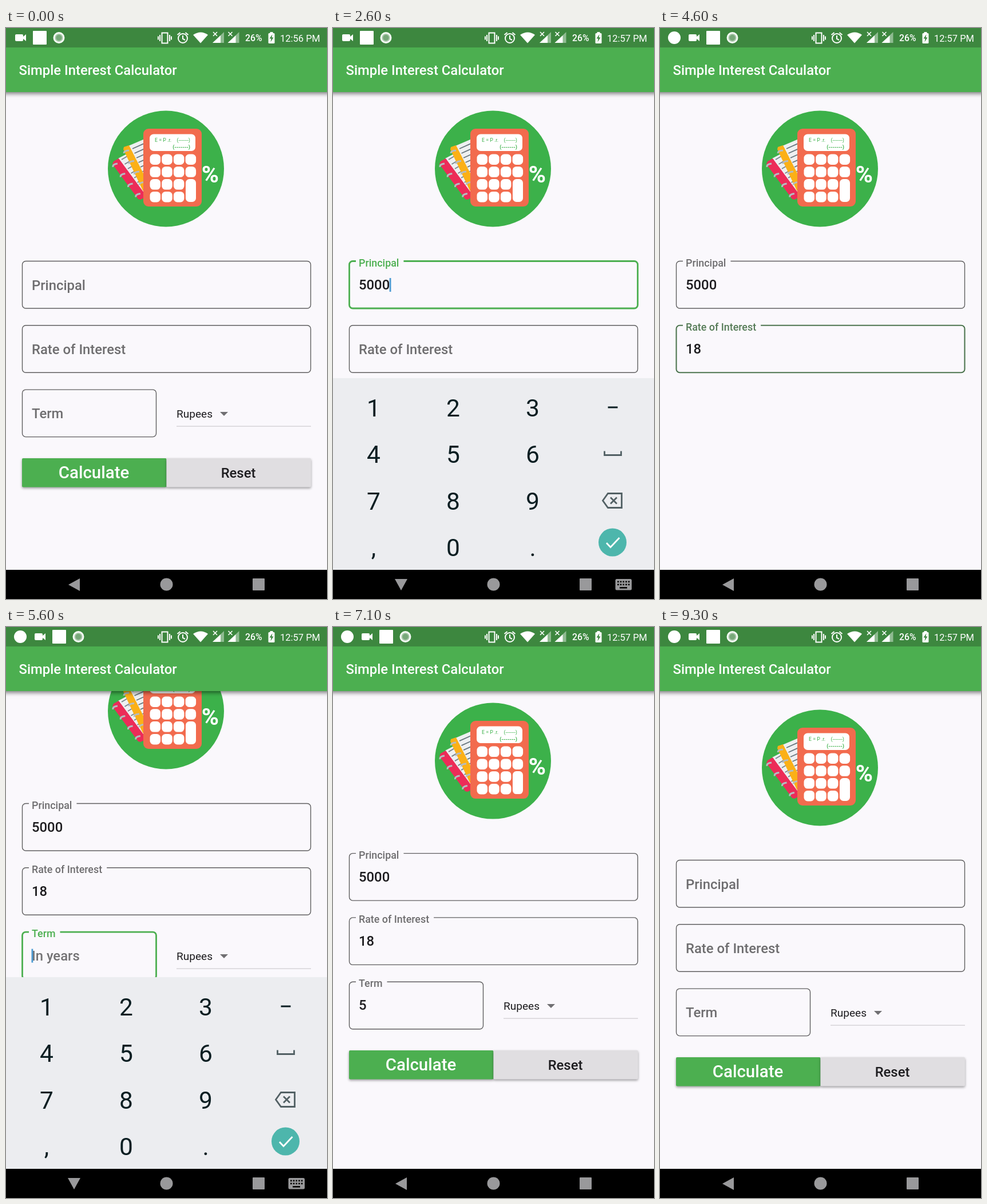
An HTML page with a canvas for the animation above (9700 ms loop, 561 by 998 pixels).

```html
<!DOCTYPE html>
<html lang="en">
<head>
<meta charset="utf-8">
<title>Simple Interest Calculator</title>
<style>
html, body { margin: 0; width: 100%; height: 100%; overflow: hidden; background: #faf8fc; }
canvas { display: block; width: 561px; height: 998px; }
</style>
</head>
<body>
<canvas id="stage" width="561" height="998"></canvas>
<script>
const c = document.getElementById('stage').getContext('2d');
const LOOP = 9700, GREEN = '#4caf50', PAPER = '#faf8fc', INK = '#1d1c1f', ICON = '#99999b';
const TITLE = 23.84, BODY = 19.07;

const ramp = (t, start, length) => Math.min(1, Math.max(0, (t - start) / length));
const ease = p => p * p * (3 - 2 * p);
const mix = (a, b, p) => a + (b - a) * p;
const between = (t, a, b) => t >= a && t < b;
const pulse = (t, on, off, length) => ease(ramp(t, on, length)) * (1 - ease(ramp(t, off, length)));
// Colour between translucent black and the theme green.
const tint = (p, alpha) => `rgba(${76 * p},${175 * p},${80 * p},${mix(alpha, 1, p)})`;

function text(str, x, y, size, color = INK, weight = 400, align = 'left') {
  c.font = `${weight} ${size}px Roboto, sans-serif`;
  c.textAlign = align;
  c.fillStyle = color;
  c.fillText(str, x, y);
}
function box(x, y, w, h, color, r = 0) {
  c.beginPath();
  c.roundRect(x, y, w, h, r);
  c.fillStyle = color;
  c.fill();
}
function disc(x, y, r, color) {
  c.beginPath();
  c.arc(x, y, r, 0, 7);
  c.fillStyle = color;
  c.fill();
}
function poly(color, ...xy) {
  c.beginPath();
  for (let i = 0; i < xy.length; i += 2) c.lineTo(xy[i], xy[i + 1]);
  c.closePath();
  c.fillStyle = color;
  c.fill();
}
function stroke(d, color, width = 2) {
  c.strokeStyle = color;
  c.lineWidth = width;
  c.stroke(new Path2D(d));
}
function shadowed(blur, dy, alpha, draw) {
  c.save();
  c.shadowColor = `rgba(0,0,0,${alpha})`;
  c.shadowBlur = blur;
  c.shadowOffsetY = dy;
  draw();
  c.restore();
}
function clipped(x, y, w, h, draw) {
  c.save();
  c.beginPath();
  c.rect(x, y, w, h);
  c.clip();
  draw();
  c.restore();
}

function statusBar(t) {
  box(0, 0, 561, 34, '#3d873f');
  const late = t >= 3400, dx = late ? 34 : 0;
  if (late) disc(25, 17, 11, '#fff');
  box(16 + dx, 11, 14, 12, '#fff', 2);
  poly('#fff', 29 + dx, 16, 35 + dx, 11, 35 + dx, 23, 29 + dx, 18);
  box(47 + dx, 5, 24, 24, '#fff', 1);
  disc(92.5 + dx, 17, 10, '#f4faf4');
  disc(92.5 + dx, 17, 7, '#a9c6aa');
  disc(92.5 + dx, 17, 5, '#77a879');

  stroke('M272.5 8.5h10v18h-10zM269 12v11M286 12v11M266 14.5v6M289 14.5v6', '#fff');
  stroke('M301 18a8 8 0 1 0 16 0a8 8 0 1 0-16 0M309 13v6l4 2M299.500 12l5-4M318.500 12l-5-4', '#fff');
  c.fillStyle = '#fff';
  c.fill(new Path2D('M327 12Q340.500 3 353 12L340 26.500Z'));
  for (const x of [361, 387.5]) {
    poly('#8fbb91', x, 26, x + 20, 7, x + 20, 26);
    poly('#fff', x, 26, x + 14, 13, x + 14, 26);
    stroke(`M${x + 1} 7l7 7M${x + 8} 7l-7 7`, '#fff', 1.6);
  }
  text('26%', 418, 23, 15.8, '#fff', 500);
  box(458.5, 9, 11, 18, '#fff', 1.5);
  box(461.5, 7, 5, 3, '#fff');
  poly('#3d873f', 465.5, 11, 460.5, 18.5, 463.5, 18.5, 462.5, 24.5, 467.5, 16.5, 464.5, 16.5);
  text(t < 1000 ? '12:56 PM' : '12:57 PM', 549, 23.5, 16.5, '#fff', 400, 'right');
}

function appBar() {
  shadowed(7, 3, .5, () => box(-10, 34, 581, 78, GREEN));
  text('Simple Interest Calculator', 22.5, 81.5, TITLE, '#fff', 500);
}

function notebooks() {
  poly('#eef0f1', 196, 228, 234, 208, 250, 300, 240, 294);
  for (let i = 0; i < 6; i++) {
    const x = 202 + i * 5.5, y = 230 + i * 8;
    stroke(`M${x} ${y}l22-13`, '#77848b', 1.8);
  }
  c.lineJoin = 'round';
  poly('#ec2c58', 186, 238, 188, 233, 197, 228, 242, 289, 241, 297, 235, 300, 231, 299);
  poly('#eef0f1', 214, 206, 242, 194, 242, 270);
  for (let i = 0; i < 6; i++) {
    const x = 221 + i * 3.5, y = 211 + i * 8;
    stroke(`M${x} ${y}L243 ${y - (243 - x) * .45}`, '#66757c', 1.8);
  }
  poly('#fbb017', 205, 212, 206, 208, 215, 205, 243, 260, 243, 286, 239, 284);
  for (let i = 0; i < 4; i++) {
    const red = `M${187 + i * 13.3} ${243 + i * 17.5}q-1-5 8-6`;
    const yellow = `M${206 + i * 9} ${219 + i * 18.5}q0-5 9-5`;
    for (const ring of [red, yellow]) stroke(ring, '#b5bcc0', 3);
  }
}

function artwork() {
  disc(279.5, 246, 101.5, '#3cb14a');
  notebooks();
  text('%', 357, 269.500, 41, '#fff', 700, 'center');
  box(240, 176, 102, 136, '#f26b4e', 9);
  box(251, 185.500, 80, 29.500, '#fff', 7);
  text('E = P .r.', 260, 199, 8.8, '#3cb14a');
  text('(-------)', 322, 199, 9, '#3cb14a', 400, 'right');
  text('(-------)', 322, 211, 9, '#3cb14a', 700, 'right');
  for (let row = 0; row < 4; row++)
    for (let col = 0; col < 4; col++) {
      if (col === 3 && row > 1) continue;
      box(251.500 + col * 20.7, 220.500 + row * 21.8, 18.500, 18.500, '#fff', 6.500);
    }
  box(314, 264, 18, 40, '#fff', 6.500);
}

// Outlined input whose label floats up into a notch of the border.
function field(t, o) {
  const { label, y, value, hint } = o, x = 28.5, r = 6;
  const right = o.right - .5, top = y + .5, bottom = y + 83;
  const float = pulse(t, o.on, 9100, 180);
  const focus = pulse(t, o.on, o.off, 200);
  const size = mix(TITLE, TITLE * .75, float);
  c.font = `500 ${TITLE * .75}px Roboto, sans-serif`;
  const gapEnd = mix(40, 53 + c.measureText(label).width, float);
  c.beginPath();
  c.moveTo(gapEnd, top);
  c.arcTo(right, top, right, bottom, r);
  c.arcTo(right, bottom, x, bottom, r);
  c.arcTo(x, bottom, x, top, r);
  c.arcTo(x, top, right, top, r);
  c.lineTo(40, top);
  c.strokeStyle = tint(focus, .62);
  c.lineWidth = mix(1.4, 2.8, focus);
  c.stroke();
  text(label, 45, mix(y + 50.5, y + 9.7, float), size, tint(focus, .56), 500);

  if (value) text(value, 45, y + 49.500, TITLE, INK, 500);
  else if (focus > .5) text(hint, 45, y + 50.500, TITLE, `rgba(0,0,0,${.54 * focus})`, 500);
  if (between(t, o.on, o.off) && (t - o.on) % 1000 < 500 || between(t, ...o.typing)) {
    c.font = `500 ${TITLE}px Roboto, sans-serif`;
    box(44.500 + c.measureText(value).width, y + 30, 2.8, 24, '#4c9bd3');
  }
}

// Characters appear one by one and vanish on reset.
const typed = (t, str, start, step) =>
  t < start || t >= 9100 ? '' : str.slice(0, 1 + Math.floor((t - start) / step));

function ripple(t, start, x, y, area) {
  const p = ramp(t, start, 250);
  if (p <= 0 || p >= 1) return;
  clipped(...area, () => disc(x, y, 20 + 200 * p, `rgba(255,255,255,${.35 * (1 - p)})`));
}

function form(t) {
  artwork();
  field(t, { label: 'Principal', y: 407, right: 533, on: 1300, off: 3000, typing: [1900, 2850],
    value: typed(t, '5000', 1900, 200), hint: 'Enter Principal e.g. 12000' });
  field(t, { label: 'Rate of Interest', y: 519.300, right: 533, on: 3000, off: 4500, typing: [3600, 4300],
    value: typed(t, '18', 3600, 300), hint: 'In percent' });
  field(t, { label: 'Term', y: 631.600, right: 263, on: 5200, off: 6700, typing: [6200, 6600],
    value: typed(t, '5', 6200, 300), hint: 'In years' });

  const currency = between(t, 8000, 9100) ? 'Dollars' : 'Rupees';
  text(currency, 298, 681, BODY);
  poly('#706f72', 374, 671, 388, 671, 381, 678);
  box(298, 695.500, 235, 1.200, '#cfcdd1');

  shadowed(4, 2, .38, () => {
    box(28, 752, 252.500, 50.500, GREEN, 2);
    box(280.500, 752, 252.500, 50.500, '#e0dee1', 2);
  });
  ripple(t, 8350, 150, 778, [28, 752, 252.500, 50.500]);
  ripple(t, 9050, 405, 778, [280.500, 752, 252.500, 50.500]);
  text('Calculate', 153.500, 786.500, 29.45, '#fff', 500, 'center');
  text('Reset', 406, 786, TITLE, INK, 500, 'center');
  if (between(t, 8500, 9100))
    text('After 5 years, your investment will be worth 9500.0 Dollars', 28, 857, BODY);
}

function popup(t) {
  const open = ease(ramp(t, 7300, 250)), shown = open * (1 - ramp(t, 7950, 200));
  if (shown <= 0) return;
  const top = mix(640, 629, open), height = mix(68, 224, open);
  c.save();
  c.globalAlpha = shown;
  shadowed(16, 6, .5, () => box(270, top, 300, height, PAPER, 3));
  clipped(270, top, 291, height, () => {
    if (t >= 7700) {
      box(270, 707, 291, 66, '#f5f4f5');
      clipped(270, 707, 291, 66, () =>
        disc(375, 750, 3 + 190 * ease(ramp(t, 7800, 300)), 'rgba(0,0,0,.09)'));
    }
    ['Rupees', 'Dollars', 'Pounds'].forEach((name, i) => text(name, 292.500, 680.500 + i * 67.400, BODY));
  });
  c.restore();
}

function keyboard(open) {
  if (open <= 0) return;
  c.save();
  c.translate(0, 335 * (1 - open));
  box(0, 612, 561, 335, '#ecedf0');
  ['123', '456', '789', ',0.'].forEach((row, r) =>
    [...row].forEach((key, i) => text(key, 71 + i * 139, 679 + r * 81.400, 42.500, '#0b1e22', 400, 'center')));
  box(480.500, 661.500, 17, 3, '#0b1e22');
  stroke('M474.500 739.500v7h29v-7', '#526064', 2.8);
  stroke('M471.500 826l9-12.500h24v25h-24zM485 820.500l11 11M496 820.500l-11 11', '#526064', 2.8);
  disc(488.500, 899, 24.500, '#4db6ac');
  stroke('M478 900l7 7.500L500.500 891', '#fff', 2.8);
  c.restore();
}

function navBar(typing) {
  box(0, 947, 561, 51, '#000');
  if (typing) {
    poly(ICON, 108, 963, 130, 963, 119, 983);
    box(493.500, 963, 28.500, 19.500, ICON, 2.500);
    for (let row = 0; row < 2; row++)
      for (let i = 0; i < 5; i++) box(497 + i * 4.700, 966.500 + row * 5, 2.600, 2.600, '#000');
    box(501, 977, 13, 2.600, '#000');
  } else {
    poly(ICON, 109, 973, 129, 962, 129, 984);
  }
  disc(280.500, 972.500, 11, ICON);
  box(431, 962, 21, 21, ICON, 1);
}

function draw(t) {
  const inset = between(t, 1600, 4700) || between(t, 5450, 6800);
  const open = ease(ramp(t, 1400, 200)) * (1 - ramp(t, 4450, 150))
    + ease(ramp(t, 5250, 200)) * (1 - ramp(t, 6650, 120));
  const scroll = 99 * ease(ramp(t, 5400, 180)) * (1 - ramp(t, 6800, 500)) ** 2.3;

  box(0, 0, 561, 998, PAPER);
  clipped(0, 112, 561, (inset ? 612 : 947) - 112, () => {
    c.translate(0, -scroll);
    form(t);
  });
  appBar();
  statusBar(t);
  popup(t);
  keyboard(open);
  navBar(open > .3);
}

function tick() {
  draw(performance.now() % LOOP);
  requestAnimationFrame(tick);
}
tick();
</script>
</body>
</html>
```
